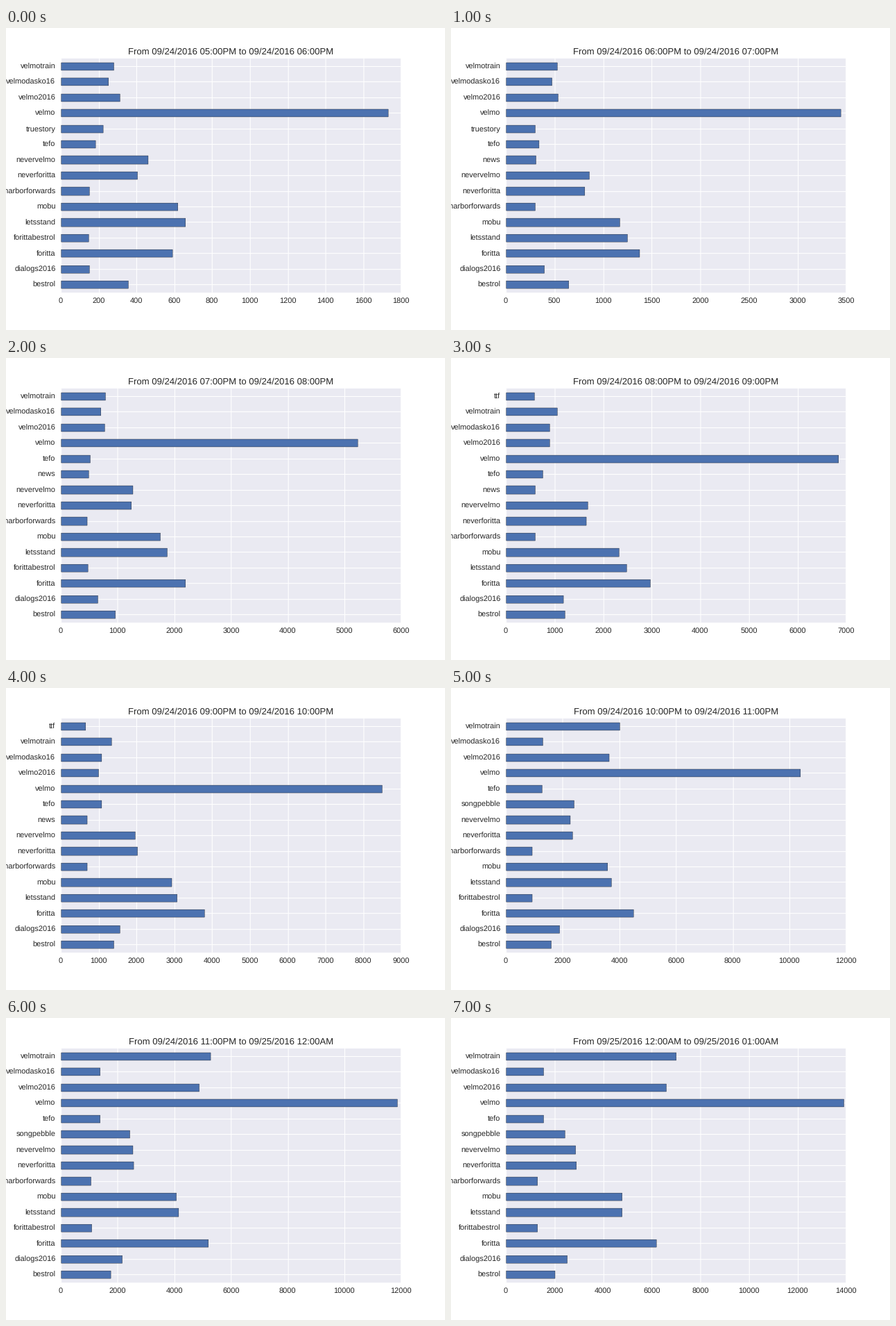
Animation, 633 px wide and 435 px high, one loop 8 s. Source, as a matplotlib script:

```python
import matplotlib.pyplot as plt
import numpy as np
from matplotlib.animation import FuncAnimation
from matplotlib.patches import Rectangle

W, H, DPI = 633, 435, 64
# The chart is laid out on a smaller pixel grid and scaled up to the stage
GRID_W, GRID_H = 576, 396
UNIT = W / GRID_W * 72 / DPI  # points per grid pixel
LEFT, RIGHT = 0.125 * GRID_W, 0.9 * GRID_W
TOP, BOTTOM = 0.1 * GRID_H, 0.875 * GRID_H
PAD = 7

plt.rcParams["font.family"] = "Liberation Sans"
plt.rcParams["text.hinting"] = "none"

INK, PANEL, BAR = "#262626", "#EAEAF2", "#4C72B0"

# Bottom to top
ORDER = [
    "bestrol", "dialogs2016", "foritta", "forittabestrol", "letsstand",
    "mobu", "movetheharborforwards", "neverforitta", "nevervelmo", "news",
    "songpebble", "tefo", "truestory", "velmo", "velmo2016",
    "velmodasko16", "velmotrain", "ttf",
]

# Running totals of the tags present in every hour, at KNOTS hours
KNOTS = [0, 2, 3, 4, 5, 7]
TOTALS = {
    "bestrol": [355, 958, 1211, 1410, 1587, 2008],
    "dialogs2016": [153, 647, 1182, 1557, 1905, 2522],
    "foritta": [590, 2193, 2966, 3795, 4497, 6189],
    "letsstand": [658, 1870, 2481, 3070, 3714, 4776],
    "mobu": [619, 1753, 2324, 2933, 3580, 4776],
    "movetheharborforwards": [153, 457, 597, 686, 914, 1295],
    "neverforitta": [407, 1240, 1653, 2025, 2345, 2893],
    "nevervelmo": [461, 1270, 1682, 1961, 2283, 2864],
    "tefo": [183, 512, 754, 1071, 1268, 1537],
    "velmo": [1731, 5233, 6840, 8493, 10380, 13896],
    "velmo2016": [311, 768, 897, 989, 3641, 6617],
    "velmodasko16": [254, 701, 897, 1071, 1293, 1537],
    "velmotrain": [282, 793, 1054, 1337, 4032, 7002],
}

# The two tags that come and go, hour by hour
GUESTS = [
    {"forittabestrol": 149, "truestory": 223},
    {"news": 312, "truestory": 305},
    {"forittabestrol": 475, "news": 487},
    {"news": 597, "ttf": 583},
    {"news": 686, "ttf": 650},
    {"forittabestrol": 914, "songpebble": 2418},
    {"forittabestrol": 1100, "songpebble": 2420},
    {"forittabestrol": 1295, "songpebble": 2422},
]
SAMPLE = [0, 0.98, 2, 3, 4, 5, 5.84, 7]
LIMIT = [1800, 3500, 6000, 7000, 9000, 12000, 12000, 14000]
STEP = [200, 500, 1000, 1000, 1000, 2000, 2000, 2000]


def stamp(hour):
    day, h = divmod(hour, 24)
    half = "PM" if h >= 12 else "AM"
    return f"09/{24 + day}/2016 {h % 12 or 12:02d}:00{half}"


def counts(i):
    data = {tag: np.interp(SAMPLE[i], KNOTS, v) for tag, v in TOTALS.items()}
    data.update(GUESTS[i])
    return [(tag, data[tag]) for tag in ORDER if tag in data]


def snap(v):
    """Centre of the grid pixel nearest to v."""
    return np.floor(v + 0.5) + 0.5


def box(x0, y0, x1, y1, **style):
    ax.add_patch(Rectangle((x0, y0), x1 - x0, y1 - y0, snap=False, **style))


def label(x, y, text, size=10, **align):
    ax.text(x, y, text, fontsize=size * UNIT, color=INK, **align)


fig = plt.figure(figsize=(W / DPI, H / DPI), dpi=DPI, facecolor="white")
ax = fig.add_axes([0, 0, 1, 1])


def draw(i):
    ax.clear()
    ax.axis("off")
    ax.set_xlim(0, GRID_W)
    ax.set_ylim(GRID_H, 0)

    bars = counts(i)
    row_h = (BOTTOM - TOP) / len(bars)
    rows = BOTTOM - (np.arange(len(bars)) + 0.5) * row_h
    ticks = np.arange(0, LIMIT[i] + 1, STEP[i])
    scale = (RIGHT - LEFT) / LIMIT[i]

    x0, y0, x1, y1 = np.floor(np.array([LEFT, TOP, RIGHT, BOTTOM]) + 0.5)
    box(x0, y0, x1, y1, facecolor=PANEL, linewidth=0, zorder=0)
    line = dict(colors="white", linewidth=UNIT, snap=False, zorder=1)
    ax.vlines(snap(LEFT + ticks * scale), y0, y1, **line)
    ax.hlines(snap(rows), x0, x1, **line)

    for y, (tag, value) in zip(rows, bars):
        end = np.floor(LEFT + value * scale) + 0.5
        box(snap(LEFT), snap(y - row_h / 4), end, snap(y + row_h / 4),
            facecolor=BAR, edgecolor="black", linewidth=0.3 * UNIT, zorder=2)
        label(LEFT - PAD, y, tag, ha="right", va="center_baseline")
    for t in ticks:
        label(LEFT + t * scale, BOTTOM + PAD, str(t), ha="center", va="top")
    label((LEFT + RIGHT) / 2, TOP - 5,
          f"From {stamp(17 + i)} to {stamp(18 + i)}", size=12,
          ha="center", va="baseline")
    return []


anim = FuncAnimation(fig, draw, frames=len(LIMIT), interval=1000, repeat=True)
plt.show()
```
